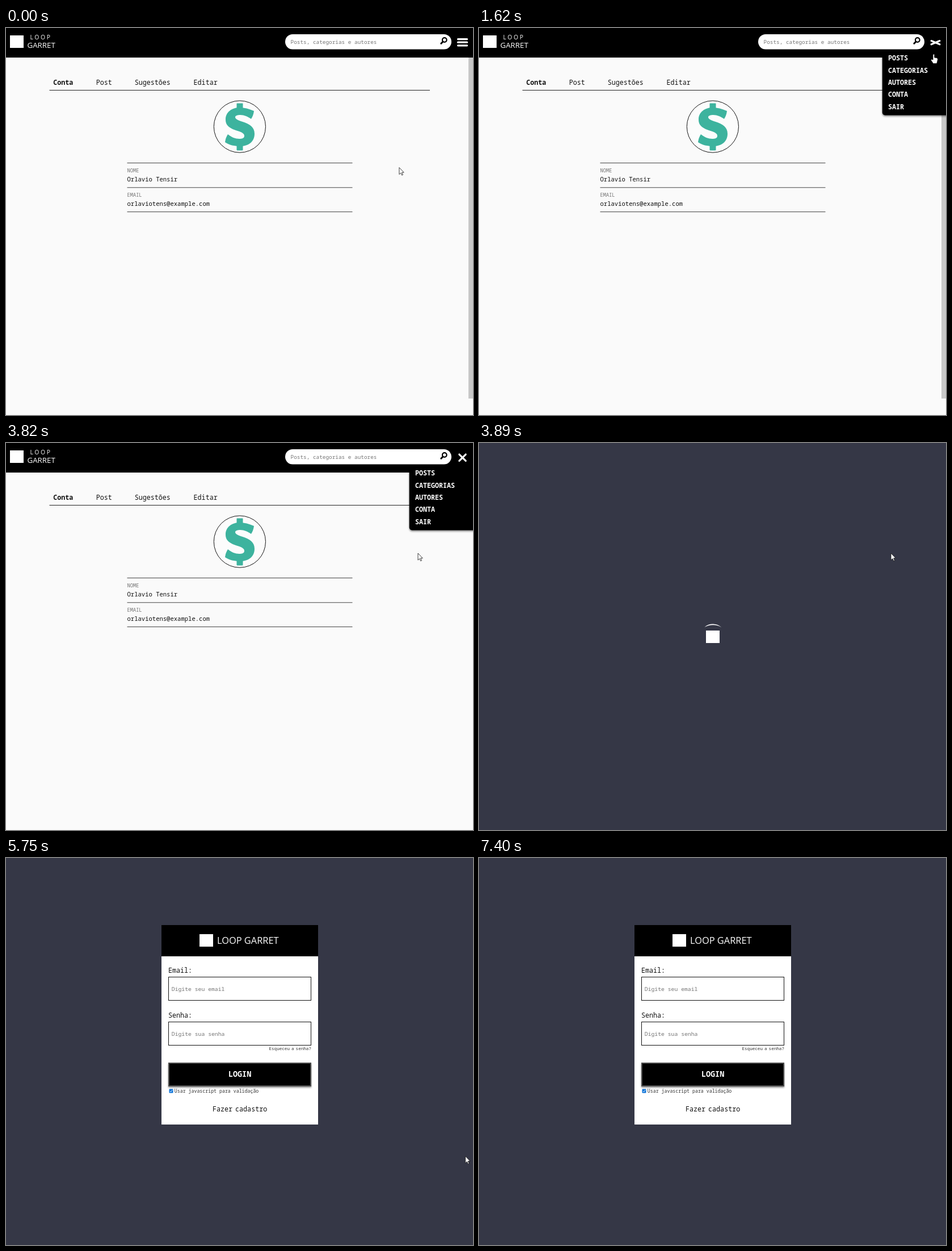
These frames come from a looping animation (823 px wide and 681 px high, 8.08 s). An HTML page:

```html
<!DOCTYPE html>
<html lang="pt-BR">
<head>
<meta charset="utf-8">
<title>Conta</title>
<style>
  html, body { margin: 0; width: 100%; height: 100%; overflow: hidden; background: #353746; }
  svg { display: block; width: 823px; height: 681px; }
  text { font-family: "Noto Sans Mono", "DejaVu Sans Mono", monospace; font-size: 11.7px; fill: #111; }
  .sans { font-family: "Open Sans", "Noto Sans", sans-serif; fill: #fff; }
  .hint { fill: #757575; }
  .menu text { fill: #fff; font-weight: 600; }
  .rule { stroke: #444; stroke-width: 1; }
  .field { fill: #fff; stroke: #111; stroke-width: 1; }
  .bars { stroke: #fff; stroke-width: 3.2; stroke-linecap: round; }
</style>
</head>
<body>
<svg viewBox="0 0 823 681">
  <defs>
    <filter id="soft" x="-10%" y="-30%" width="120%" height="180%">
      <feDropShadow dx="0" dy="2" stdDeviation="1.7" flood-opacity=".45"/>
    </filter>
  </defs>

  <g id="account">
    <rect width="823" height="681" fill="#fafafa"/>
    <rect id="scrollbar" x="815" y="52" width="8" height="600" fill="#c7c7c7"/>
    <rect width="823" height="52"/>
    <rect x="7" y="13" width="24" height="22" fill="#fff"/>
    <text class="sans" x="42.5" y="20" style="font-size:10.4px;letter-spacing:2.6px">LOOP</text>
    <text class="sans" x="37.5" y="34.7" style="font-size:13.3px">GARRET</text>
    <rect x="492" y="11" width="293" height="26.5" rx="13.2" fill="#fff"/>
    <text class="hint" x="501.5" y="28" style="font-size:9.4px">Posts, categorias e autores</text>
    <circle cx="772.8" cy="21" r="3.8" fill="none" stroke="#000" stroke-width="2.2"/>
    <path d="M769.8 24.2L766.8 27.2" stroke="#000" stroke-width="3" stroke-linecap="round"/>

    <g id="tabs"></g>
    <path d="M76.5 109.5H747" stroke="#222" stroke-width="1.2"/>
    <circle cx="411.9" cy="173.6" r="45.6" fill="#fcfcfc" stroke="#111"/>
    <g fill="#3db39e">
      <path d="M437 146C428 142 420 140 412 140C398 140 387 148 387 161C387 173 396 177 408 181C417 184 420 186 420 190
        C420 194 416 195 411 195C404 195 397 192 391 187Q387 193 386 201C394 206 402 208 412 208C428 208 438 200 438 186
        C438 174 429 169 417 165C408 162 404 160 404 157C404 154 408 153 413 153C420 153 426 156 432 160Q436 154 437 146Z"/>
      <rect x="406.5" y="132.5" width="11" height="12" rx="1"/>
      <rect x="406.5" y="203" width="11" height="12.5" rx="1"/>
    </g>
    <path class="rule" d="M213.5 237.5H610.5M213.5 280.8H610.5M213.5 323.5H610.5"/>
    <g id="details"></g>

    <g id="menu" class="menu">
      <rect x="710.7" y="44" width="125" height="109.5" rx="5" filter="url(#soft)"/>
    </g>
    <g class="bars">
      <path id="barTop" d="M-8 0H8"/>
      <path id="barMid" d="M796.5 25.2H812.5"/>
      <path id="barLow" d="M-8 0H8"/>
    </g>
    <g id="status">
      <rect x="-4" y="670" width="99" height="20" rx="3" fill="#3b3b3d"/>
      <text class="sans" x="1.5" y="680.5" style="font-size:8px;fill:#ddd">localhost:8000/logout/</text>
    </g>
  </g>

  <g id="login">
    <rect width="823" height="681" fill="#353746"/>
    <g id="loader" fill="#fff">
      <path id="spinner" d="M-15-16A22 22 0 0 1 15-16A30 30 0 0 0-15-16Z"/>
      <rect x="400" y="330" width="24" height="22"/>
    </g>
    <g id="card">
      <rect x="274" y="118" width="276" height="351" fill="#fff"/>
      <rect x="274" y="118" width="276" height="55"/>
      <rect x="341" y="134" width="24" height="22" fill="#fff"/>
      <text class="sans" x="372" y="151" style="font-size:16.4px">LOOP GARRET</text>
      <rect class="field" x="286.5" y="209.5" width="251" height="41"/>
      <rect class="field" x="286.5" y="288.5" width="251" height="41"/>
      <rect x="287" y="361" width="250" height="40" stroke="#4d4d4d" stroke-width="2" filter="url(#soft)"/>
      <rect x="287.5" y="406.5" width="7" height="7" rx="1" fill="#0b73d9"/>
      <path d="M289 410L290.5 411.7L293.2 408.3" fill="none" stroke="#fff"/>
    </g>
  </g>

  <g id="cursor">
    <path id="arrow" d="M.5.5V12.6L3.3 10L5.2 14.1L7 13.3L5.2 9.2H8.8Z" fill="#fff" stroke="#111" stroke-width=".8"/>
    <path id="hand" d="M-1.5 1Q0-1 1.2 1V6L5 6.5Q7 7 7 9L6 14L5 16.5H-1L-5 10.5Q-4.5 8-1.5 10Z"
      fill="#fff" stroke="#111" stroke-width=".8"/>
  </g>
</svg>
<script>
const LOOP = 8080;
const $ = id => document.getElementById(id);

function write(parent, x, y, label, size = 11.7, style = '') {
  const text = document.createElementNS($('menu').namespaceURI, 'text');
  text.setAttribute('x', x);
  text.setAttribute('y', y);
  text.style.cssText = `font-size:${size}px;${style}`;
  text.textContent = label;
  $(parent).append(text);
}

const grey = 'fill:#757575';
write('tabs', 83.3, 99.5, 'Conta', 11.7, 'font-weight:700');
write('tabs', 158.8, 99.5, 'Post');
write('tabs', 226.7, 99.5, 'Sugestões');
write('tabs', 330.6, 99.5, 'Editar');
write('details', 213.5, 254, 'NOME', 8.7, grey);
write('details', 213.5, 270, 'Orlavio Tensir', 10.55);
write('details', 213.5, 297, 'EMAIL', 8.7, grey);
write('details', 213.5, 312.5, 'orlaviotens@example.com', 10.55);
['POSTS', 'CATEGORIAS', 'AUTORES', 'CONTA', 'SAIR'].forEach((item, i) =>
  write('menu', 721, 57.3 + i * 21.35, item));
write('card', 286, 202, 'Email:');
write('card', 291.8, 234, 'Digite seu email', 9.75, grey);
write('card', 286, 280.7, 'Senha:');
write('card', 291.8, 312.5, 'Digite sua senha', 9.75, grey);
write('card', 463.5, 337.5, 'Esqueceu a senha?', 7.6, 'fill:#333;word-spacing:-1.5px');
write('card', 392, 385, 'LOGIN', 13.4, 'fill:#fff;font-weight:600');
write('card', 296.8, 413, 'Usar javascript para validação', 8.25, 'fill:#333');
write('card', 364, 446, 'Fazer cadastro', 11.7, 'word-spacing:-2px');

// time, x, y of the pointer tip
const path = [
  [0, 692.5, 245], [70, 690, 244], [200, 684, 238], [500, 735, 150], [810, 801, 60],
  [1000, 802, 48], [1620, 801.5, 46], [1750, 800, 52], [2200, 768, 118], [2470, 744, 134],
  [2570, 742, 140], [2680, 741, 168.5], [2770, 740, 170], [3290, 725.5, 193.5],
  [4970, 725.5, 193.5], [5290, 824, 366], [5750, 809.2, 524.3], [6100, 785, 534],
  [6500, 761, 539], [6570, 760, 538], [6750, 747, 534], [7000, 753, 575], [7400, 777, 680.5]
];

const clamp = v => Math.max(0, Math.min(1, v));
const show = (id, visible) => { $(id).style.display = visible ? '' : 'none'; };
const place = (id, x, y, angle = 0) =>
  $(id).setAttribute('transform', `translate(${x} ${y}) rotate(${angle})`);

function pointerAt(t) {
  const next = path.findIndex(key => key[0] > t);
  if (next < 0) return path.at(-1).slice(1);
  const [t0, x0, y0] = path[next - 1], [t1, x1, y1] = path[next];
  const p = (t - t0) / (t1 - t0);
  return [x0 + (x1 - x0) * p, y0 + (y1 - y0) * p];
}

// The bars meet in the middle first, then turn into a cross.
function drawBars(progress) {
  const meet = clamp(progress * 2);
  const turn = 45 * clamp(progress * 2 - 1);
  place('barTop', 804.5, 19.7 + 6 * meet, turn);
  place('barLow', 804.5, 30.8 - 5.1 * meet, -turn);
  show('barMid', meet < 1);
}

function draw(t) {
  const isLogin = t >= 3890;
  show('account', !isLogin);
  show('login', isLogin);

  drawBars(clamp((t - 1470) / 200));
  show('menu', t >= 1550);
  show('scrollbar', t < 1770);
  show('status', t >= 2250 && t < 2900);

  place('spinner', 412.3, 340.3, (t - 3890) * 0.36);
  const reveal = t < 4360 ? 0 : clamp((t - 4300) / 190);
  $('card').style.opacity = reveal;
  show('loader', reveal < 1);

  const overLink = t >= 950 && t < 2620;
  show('cursor', t < 5290 || (t >= 5750 && t < 7460));
  show('arrow', !overLink);
  show('hand', overLink);
  place('cursor', ...pointerAt(t));
}

const start = performance.now();
function tick() {
  draw((performance.now() - start) % LOOP);
  requestAnimationFrame(tick);
}
tick();
</script>
</body>
</html>
```
